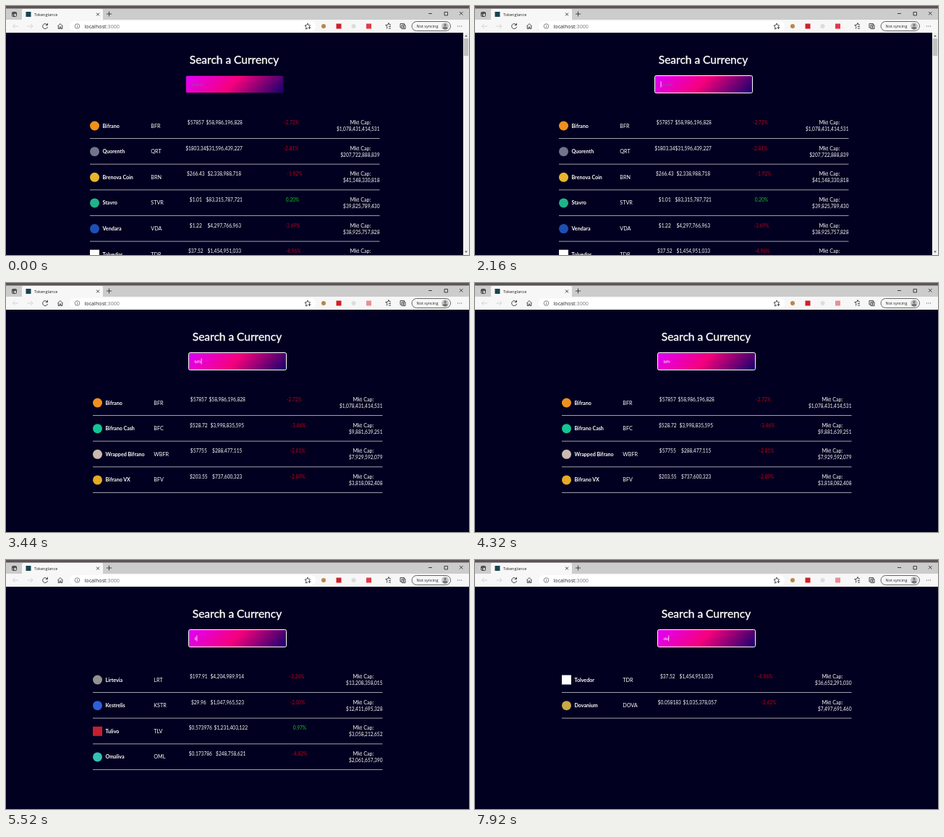
Animation of 640x345 px, one loop 8000 ms. Source, as an HTML page:

```html
<!DOCTYPE html>
<html lang="en">
<head>
<meta charset="utf-8">
<title>Currency search</title>
<style>
  html, body { margin: 0; height: 100%; overflow: hidden; background: #010020; }
  svg { display: block; width: 100vw; height: 100vh; }
  text { font-family: Lato, "Open Sans", sans-serif; font-size: 6.6px; fill: #fff; white-space: pre; }
  .ui { font-family: "Open Sans", "Noto Sans", sans-serif; fill: #222; }
  .mid { text-anchor: middle; }
  .end { text-anchor: end; }
  .name { font-size: 7.1px; font-weight: 700; }
  .code { font-size: 7.2px; }
  .up { fill: #10c81e; }
  .down { fill: #c20018; }
  .line { fill: none; stroke: #333; stroke-width: .9; }
  #box { position: absolute; }
</style>
</head>
<body>
<svg viewBox="0 0 640 345" preserveAspectRatio="none">
  <defs>
    <linearGradient id="glow" gradientUnits="userSpaceOnUse" x1="276.5" y1="69.5" x2="355.5" y2="147.5">
      <stop offset="0" stop-color="#df00fb"/>
      <stop offset=".48" stop-color="#f6007c"/>
      <stop offset="1" stop-color="#14006e"/>
    </linearGradient>
  </defs>
  <rect width="640" height="345" fill="#010020"/>

  <g id="page">
    <text x="315.5" y="80" class="mid" style="font-size:15.5px" stroke="#fff" stroke-width=".35">Search a Currency</text>
    <rect id="field" x="248.5" y="96.5" width="135" height="24" rx="2" fill="url(#glow)"/>
    <text id="hint" x="256.5" y="111" style="font-size:5.6px;fill:#8a5a96">Search</text>
    <text id="typed" x="256.5" y="111" style="font-size:6px"></text>
    <rect id="caret" y="104.5" width=".8" height="8" fill="#fff"/>
    <g id="rows"></g>
  </g>

  <g id="bar">
    <rect x="632" y="37" width="8" height="308" fill="#f1f1f1"/>
    <rect id="thumb" x="632.8" y="45" width="6.4" fill="#c1c1c1"/>
    <path d="M634 42.5l2-2.5 2 2.5zM634 339.500l2 2.500 2-2.500z" fill="#666"/>
  </g>

  <!-- browser window -->
  <rect width="640" height="20" fill="#cdcccc"/>
  <rect width="640" height="3.5" fill="#5b5457"/>
  <rect y="19" width="640" height="18" fill="#f7f7f7"/>
  <path d="M22 20V6q0-2 2-2h108q2 0 2 2v14z" fill="#f7f7f7"/>
  <rect x="88" y="21" width="340" height="14" rx="7" fill="#fff"/>
  <rect x="27.500" y="8" width="7" height="7" fill="#17454f"/>
  <text x="39" y="13.500" class="ui" style="font-size:5.6px">Tokenglance</text>
  <g class="line">
    <rect x="8.500" y="8.500" width="6" height="6" rx="1"/>
    <path d="M8.500 10h6M10.500 10v4.500" stroke-width="1.300"/>
    <path d="M125 9.500l4 4m0-4l-4 4M139 11h7M142.500 7.500v7M584 10.500h5M606 8.500h4.500v4.500H606zM627 8l4.500 4.500m0-4.500L627 12.500"/>
    <path d="M17 28H9.500l3-3m-3 3l3 3M29.500 28H37l-3-3m3 3l-3 3" stroke="#cfcfcf"/>
    <path d="M57 26a3.500 3.500 0 1 0 .6 2.800M57.500 23.800V26.500h-2.700"/>
    <path d="M71.500 28l3.500-3.500 3.500 3.500M72.300 27.500v4h2v-2.500h1.500v2.500h2v-4"/>
    <circle cx="98.500" cy="28" r="3.300" stroke="#777"/>
    <path d="M98.500 27.500v2.500M98.500 26v.8" stroke="#777"/>
    <path d="M417 31l-2.500 1 .5-3-2-2 2.800-.4 1.200-2.600 1.200 2.600 2.800.4M419.500 28v4M417.500 30h4"/>
    <path d="M526.500 31.500l.5-3-2.300-2 3-.4 1.300-2.600 1.300 2.600H532M529 28.500h3M529 31h3"/>
    <path d="M546.500 30h-1.500v-5.500h5.500v1.500M547 26.500h5v5h-5zM549.500 27.500v3M548 29h3"/>
    <rect x="561" y="21.500" width="53.500" height="13" rx="6.500" stroke="#555"/>
  </g>
  <text x="108.500" y="30.600" class="ui" style="font-size:7.2px">localhost<tspan fill="#777">:3000</tspan></text>
  <text x="567.500" y="30" class="ui" style="font-size:5.500px">Not syncing</text>
  <circle cx="607" cy="28" r="5" fill="#c8c6c4"/>
  <path d="M603.500 31.300q0-2.800 3.500-2.800t3.500 2.800q-3.500 2.700-7 0z" fill="#777"/>
  <circle cx="607" cy="26.300" r="1.700" fill="#777"/>
  <path d="M624 28h.9m1.700 0h.9m1.700 0h.9" stroke="#333" stroke-width="1"/>
  <circle cx="439" cy="28" r="3" fill="#b9854a"/>
  <rect x="456.500" y="24.500" width="7" height="7" fill="#cf2028"/>
  <circle cx="480.500" cy="28" r="3" fill="#dcdcdc"/>
  <rect id="signal" x="498" y="24.500" width="7" height="7" fill="#e23a45"/>
</svg>
<script>
const LOOP = 8000, PITCH = 35.65;

// name, code, price, volume, change, change x, market cap, icon colour
const coins = [
  ['Bifrano', 'BFR', '57857', '58,986,196,828', '-2.72', 394.5, '1,078,431,414,531', '#f0901c'],
  ['Quorenth', 'QRT', '1803.34', '31,596,439,227', '-2.81', 394, '207,722,888,839', '#70758c'],
  ['Brenova Coin', 'BRN', '266.43', '2,338,988,718', '-1.92', 399, '41,148,330,818', '#e8b62c'],
  ['Stavro', 'STVR', '1.01', '83,315,787,721', '0.20', 396, '39,825,789,430', '#1fb588'],
  ['Vendara', 'VDA', '1.22', '4,297,766,963', '-3.69', 396, '38,925,757,828', '#1d4fb4'],
  ['Tolvedor', 'TDR', '37.52', '1,454,951,033', '-4.96', 397, '36,652,291,030', '#fff'],
  ['Lirtevia', 'LRT', '197.91', '4,204,989,914', '-3.26', 398, '13,208,358,015', '#929292'],
  ['Kestrelis', 'KSTR', '29.96', '1,047,965,523', '-2.00', 399, '12,411,695,328', '#2f5fd8'],
  ['Bifrano Cash', 'BFC', '528.72', '3,998,835,595', '-3.46', 400, '9,881,639,251', '#14c596'],
  ['Wrapped Bifrano', 'WBFR', '57755', '288,477,115', '-2.81', 399, '7,929,592,079', '#cbbab2'],
  ['Dovanium', 'DOVA', '0.058183', '1,035,378,057', '-2.62', 402, '7,497,691,460', '#c9a845'],
  ['YGB', 'YGB', '14.19', '119,931,981', '-3.15', 396, '3,825,223,716', '#2f6bd8'],
  ['Bifrano VX', 'BFV', '203.55', '737,600,323', '-2.89', 399, '3,818,082,408', '#e5ab22'],
  ['Tulivo', 'TLV', '0.573976', '1,231,403,122', '0.97', 402, '3,058,212,652', '#c4202e'],
  ['Omaliva', 'OML', '0.173786', '248,758,621', '-4.82', 402, '2,061,657,390', '#35c0b5']
];
const squares = ['TDR', 'TLV'];

// [time, text in the field]; the first entry after 0 is the focus click
const FOCUS = 1120;
const keys = [
  [0, ''], [FOCUS, ''],
  [2720, 'b'], [2880, 'bi'], [3120, 'bif'], [3360, 'bifr'],
  [4640, 'bif'], [4800, 'bi'], [4960, 'b'], [5120, ''],
  [5280, 'l'], [5440, 'li'], [5680, 'lir'], [5920, 'lirt'], [6200, 'lirte'],
  [7280, 'lirt'], [7340, 'lir'], [7400, 'li'], [7460, 'l'], [7520, ''],
  [7720, 'd'], [7920, 'do']
];

const $ = id => document.getElementById(id);
const set = (id, attrs) => Object.entries(attrs).forEach(([k, v]) => $(id).setAttribute(k, v));
const show = (id, on) => set(id, { visibility: on ? 'visible' : 'hidden' });
const label = (x, y, cls, s) => `<text x="${x}" y="${y}" class="${cls}">${s}</text>`;

function row([name, code, price, volume, change, cx, cap, color], i) {
  const wide = price.length > 7 ? 5 : 0;
  const icon = squares.includes(code)
    ? `<rect x="116" y="159.500" width="13" height="13" fill="${color}"/>`
    : `<circle cx="122.500" cy="166" r="6.500" fill="${color}"/>`;
  return `<g transform="translate(0 ${i * PITCH})">${icon}` +
    label(133.5, 168.5, 'name', name) +
    label(200.3, 168.5, 'code', code) +
    label(262.3 + wide / 2, 164, 'mid', '$' + price) +
    label(301.7 + wide, 164, 'mid', '$' + volume) +
    label(cx, 164, 'mid ' + (change < 0 ? 'down' : 'up'), change + '%') +
    label(490, 164, 'mid code', 'Mkt Cap:') +
    label(516.5, 173, 'end', '$' + cap) +
    '<path d="M116 183.500h400.500" stroke="#b4b4be" stroke-width=".9"/></g>';
}

let shown = null;
function search(query) {
  if (query === shown) return;
  shown = query;
  const found = coins.filter(c => c[0].toLowerCase().includes(query));
  const scrolls = query.length < 2;
  $('rows').innerHTML = found.map(row).join('');
  $('typed').textContent = query;
  set('page', { transform: `translate(${scrolls ? 0 : 4} 0)` });
  set('thumb', { height: query ? 132 : 24 });
  show('bar', scrolls);
  show('hint', !query);
}

function draw(now) {
  const t = now % LOOP;
  const [since, query] = keys.filter(k => k[0] <= t).pop();
  const focused = t >= FOCUS;
  search(query);
  set('field', { stroke: focused ? '#fff' : '#180828' });
  set('caret', { x: 256.6 + (query && $('typed').getComputedTextLength()) });
  show('caret', focused && (t - since) % 1000 < 500);
  set('signal', { opacity: t % 885 < 500 ? 1 : .55 });
  requestAnimationFrame(() => draw(performance.now()));
}
draw(0);
</script>
</body>
</html>
```
